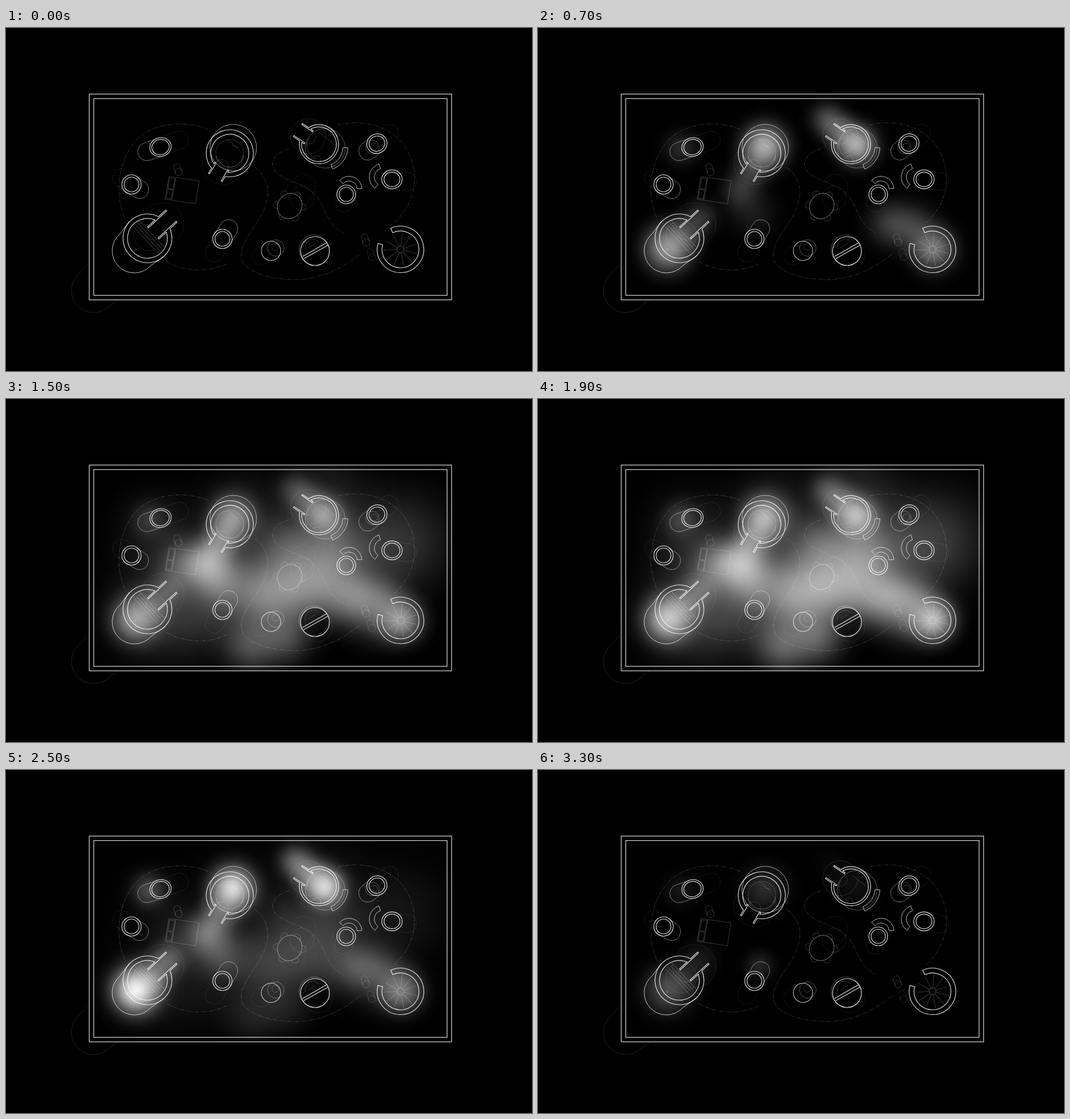
Animation, 926 px wide and 605 px high, one loop 3400 ms. Source, as an HTML page with a canvas:

```html
<!DOCTYPE html>
<html lang="en">
<head>
<meta charset="utf-8">
<title>Floor plan glow</title>
<style>
html, body { margin: 0; width: 100%; height: 100%; overflow: hidden; background: #000; }
canvas { position: absolute; left: 146px; top: 116px; }
svg { position: absolute; left: 0; top: 0; fill: none; stroke: #fff; }
</style>
</head>
<body>
<canvas id="glow" width="638" height="363"></canvas>
<svg id="plan" width="926" height="605" viewBox="0 0 926 605"></svg>
<script>
const LOOP = 3400, STEP = 100;
const ctx = document.getElementById('glow').getContext('2d');

const clamp = v => Math.max(0, Math.min(1, v));
const ramp = (t, a, b) => clamp((t - a) / (b - a));
const mix = (a, b, k) => a + (b - a) * k;

// Fade in, hold, fade out
const swell = (t, start, full, fade, end) => ramp(t, start, full) * (1 - ramp(t, fade, end));
// Towers dim while the rooms between them fill up
const dim = t => 1 - .42 * Math.exp(-(((t - 1600) / 400) ** 2));

function spot(x, y, spread, alpha) {
  const r = spread * 3, g = ctx.createRadialGradient(x, y, 0, x, y, r);
  for (let i = 0; i <= 12; i++) {
    const u = i / 12;
    const a = alpha * Math.exp(-4.5 * u * u) * (1 - u ** 4);
    g.addColorStop(u, `rgba(255,255,255,${a.toFixed(4)})`);
  }
  ctx.fillStyle = g;
  ctx.fillRect(x - r, y - r, 2 * r, 2 * r);
}

function trail(x1, y1, x2, y2, count, spread, alpha) {
  for (let i = 0; i < count; i++) {
    const k = i / (count - 1);
    spot(mix(x1, x2, k), mix(y1, y2, k), spread, alpha);
  }
}

function drawGlow(t) {
  ctx.setTransform(1, 0, 0, 1, 0, 0);
  ctx.clearRect(0, 0, 638, 363);
  ctx.translate(-146, -116);

  const north = swell(t, 0, 900, 2500, 3500) * dim(t);
  const upper = swell(t, 0, 900, 2500, 3350) * dim(t);
  const west = swell(t, 150, 1050, 2850, 3500) * dim(t);
  const east = swell(t, 350, 1050, 2100, 2900) * dim(t);
  const doors = swell(t, 400, 1050, 2300, 3300);
  const rooms = swell(t, 700, 1700, 1950, 2750);

  spot(399, 208, 26, .84 * north);
  spot(562, 207, 23, .8 * upper);
  spot(229, 388, 28, .95 * west);
  spot(252, 212, 20, .26 * west);
  spot(696, 390, 26, .92 * east);

  trail(545, 193, 508, 160, 3, 20, .3 * upper);
  trail(258, 365, 285, 335, 2, 20, .32 * west);
  trail(662, 352, 620, 345, 2, 27, .42 * east);
  trail(384, 238, 352, 290, 3, 21, .3 * doors);
  spot(378, 325, 28, .22 * doors);
  spot(390, 345, 17, .14 * swell(t, 2400, 3200, 3300, LOOP));

  trail(322, 292, 368, 300, 2, 30, .42 * rooms);
  trail(450, 345, 560, 322, 3, 38, .42 * rooms);
  trail(600, 355, 650, 385, 2, 32, .28 * rooms);
  trail(500, 260, 575, 268, 2, 35, .28 * rooms);
  trail(430, 435, 490, 420, 2, 32, .34 * rooms);
  trail(275, 375, 700, 250, 6, 60, .2 * rooms);
  trail(270, 240, 560, 165, 3, 50, .13 * rooms);
}

// Line work
const parts = [];
const add = (tag, attrs, o, w, extra = '') =>
  parts.push(`<${tag} ${attrs} stroke-opacity="${o}" stroke-width="${w}" ${extra}/>`);
const path = (d, o = 1, w = 1, extra) => add('path', `d="${d}"`, o, w, extra);
const circle = (x, y, r, o = 1, w = 1, extra) => add('circle', `cx="${x}" cy="${y}" r="${r}"`, o, w, extra);
const oval = (x, y, rx, ry, turn, o, w) =>
  add('ellipse', `rx="${rx}" ry="${ry}" transform="translate(${x} ${y}) rotate(${turn})"`, o, w);
const box = (x, y, w, h) => add('rect', `x="${x}" y="${y}" width="${w}" height="${h}"`, .85, 1.2);
function turned(x, y, angle, draw) {
  parts.push(`<g transform="translate(${x} ${y}) rotate(${angle})">`);
  draw();
  parts.push('</g>');
}
const dots = 'stroke-dasharray="3 2"';
const walk = d => path(d, .2, 1, 'stroke-dasharray="7 2 2 2"');

// Open capsule reaching from one centre to another
function reach(x1, y1, x2, y2, r, o, extra) {
  const a = Math.atan2(y2 - y1, x2 - x1);
  const nx = -Math.sin(a) * r, ny = Math.cos(a) * r;
  path(`M${x1 + nx} ${y1 + ny}L${x2 + nx} ${y2 + ny}A${r} ${r} 0 0 0 ${x2 - nx} ${y2 - ny}L${x1 - nx} ${y1 - ny}`, o, 1, extra);
}

// Closed band between two radii
function band(x, y, r1, r2, from, to, o, w) {
  const at = (r, deg) => {
    const a = deg * Math.PI / 180;
    return `${x + r * Math.cos(a)} ${y + r * Math.sin(a)}`;
  };
  const big = to - from > 180 ? 1 : 0;
  path(`M${at(r1, from)}A${r1} ${r1} 0 ${big} 1 ${at(r1, to)}L${at(r2, to)}A${r2} ${r2} 0 ${big} 0 ${at(r2, from)}Z`, o, w);
}

// Double ring with a walled doorway pointing along the angle
function tower(x, y, r1, r2, angle, half, start, end) {
  const a = half + 1.1, b = half - 1.1;
  const x1 = Math.sqrt(r1 * r1 - a * a), x2 = Math.sqrt(r2 * r2 - a * a);
  turned(x, y, angle, () => {
    path(`M${start} ${-b}A${b} ${b} 0 0 0 ${start} ${b}`, .15);
    path(`M${x1} ${a}A${r1} ${r1} 0 1 1 ${x1} ${-a}H${end}V${-b}H${start}V${-a}H${x2}A${r2} ${r2} 0 1 0 ${x2} ${a}H${start}V${b}H${end}V${a}Z`, .88, 1.15);
  });
}

// Small double ring with a solid and a dotted shadow
function post(x, y, r1, r2, squash, turn, shade, ghost) {
  if (shade) reach(x, y, x + shade[0], y + shade[1], 16, .45);
  reach(x, y, x + ghost[0], y + ghost[1], 16, .14, dots);
  oval(x, y, r1, r1 * squash, turn, .88, 1.15);
  oval(x, y, r2, r2 * squash, turn, .88, 1.15);
}

// Frame and paths
box(146.5, 116.5, 638, 363);
box(154.5, 124.5, 622, 347);
walk('M356 179C325 165 275 164 241 188C203 215 185 285 211 339');
walk('M283 412C315 430 355 432 388 416');
walk('M438 246C462 263 468 292 452 325C438 354 415 373 414 401C414 430 464 443 510 444C553 443 592 425 625 397');
walk('M498 213C477 219 462 234 473 251C485 269 521 272 541 291C566 314 559 342 594 361');
walk('M584 171C625 161 670 171 697 202C727 239 730 300 684 343');
path('M144 417L127 435A38.5 38.5 0 0 0 181 491L196 480', .13);

// North tower
circle(400, 211, 41, .62);
circle(382, 239, 37, .13, 1, dots);
tower(394, 221, 41.5, 33.5, 121, 13, 27, 49.5);
circle(394, 221, 24.5, .2);
path('M370 226A24 24 0 0 0 418 224M373 231A23 23 0 0 0 416 230M389 198Q398 199 401 208L409 211', .22);

// Upper tower
circle(562, 212, 35, .35);
circle(532, 191, 31, .13);
tower(551, 205, 34.5, 30.5, 214, 13, 22, 44.8);
path('M534 194A24 24 0 0 0 548 231M553 186L581 207M540 231Q544 222 552 227L555 234', .2);
band(559, 209, 43, 34.5, 3, 68, .75, 1);

// West tower
path('M217 341L201 363A39 39 0 1 0 255 419L279 402', .75);
circle(275, 346, 38, .14, 1, dots);
tower(249, 371, 43, 35, -43, 13.5, 14, 57.5);
turned(249, 371, -43, () => {
  for (let u = -4; u < 12; u += 5) path(`M${u} -32V32`, .22);
});
circle(252, 366, 27, .1);
circle(228, 391, 1.5, .25);

// East tower
band(694.5, 390.5, 41, 32.5, -115, 195, .88, 1.15);
circle(694.5, 390.5, 6, .3);
for (let i = 0; i < 11; i++) turned(694.5, 390.5, 14 + i * 360 / 11, () => path('M6 0H30', .22));

// Small towers
post(272, 210, 19, 15.5, .87, -15, [-24, 8], [33, -12]);
post(221, 276, 17, 13, 1, 0, [14, 9], [-17, -12]);
post(381, 372, 17, 13, 1, 0, [11, -18], [-14, 25]);
post(653, 204, 18, 14, .95, -30, [-16, 13], [22, -18]);
circle(645, 210, 12, .3);
circle(648, 209, 6, .25);
post(679.5, 267, 18, 14, .92, 0, null, [27, 4]);
band(664, 263, 24.5, 15.5, 126, 252, .7, 1);
post(599, 293.5, 16.5, 12.5, 1, 0, null, [-5, 15]);
band(604, 284, 22.5, 14, 222, 358, .7, 1);

// Round seats
circle(475, 388, 14.5, .35);
circle(474, 386, 6, .2);
reach(466, 393, 449, 402, 16, .12, dots);
circle(466.5, 393, 17, .75, 1.1);
circle(542, 391, 26, .35);
circle(549, 402, 26, .12, 1, dots);
circle(544, 393.5, 25.5, .88, 1.15, 'fill="#000" fill-opacity=".58"');
path('M522 403L564 379M524 407L567 383', .88, 1.15);
path('M527 391Q525 378 537 373Q546 370 550 378M532 388L545 380', .18);

// Flower table
reach(499, 314, 523, 280, 22, .13, dots);
circle(521, 300, 21, .1);
for (let i = 0; i < 6; i++) turned(499.5, 314, 5 + i * 60, () => path('M21 -6A6.2 6.2 0 1 1 21 6', .2));
oval(499.5, 314, 23, 21, -55, .45, 1);

// Bed and stools
path('M287 262L340 269.5L333.5 310L280 302ZM299 264L292 303M288 264.5L297.5 266L294 284.5L285 283ZM284.5 284.5L293.5 286L291 301.5L282 300Z', .22);
function stools(x, y, o) {
  reach(x + 3, y + 9, x, y, 5.8, o);
  circle(x + 3, y + 9, 6.2, o);
}
stools(301, 245, .2);
stools(631, 369, .2);
stools(641, 395, .13);
document.getElementById('plan').innerHTML = parts.join('');

let shown = -1;
function tick() {
  const t = Math.floor(performance.now() % LOOP / STEP) * STEP;
  if (t !== shown) drawGlow(shown = t);
  requestAnimationFrame(tick);
}
tick();
</script>
</body>
</html>
```
